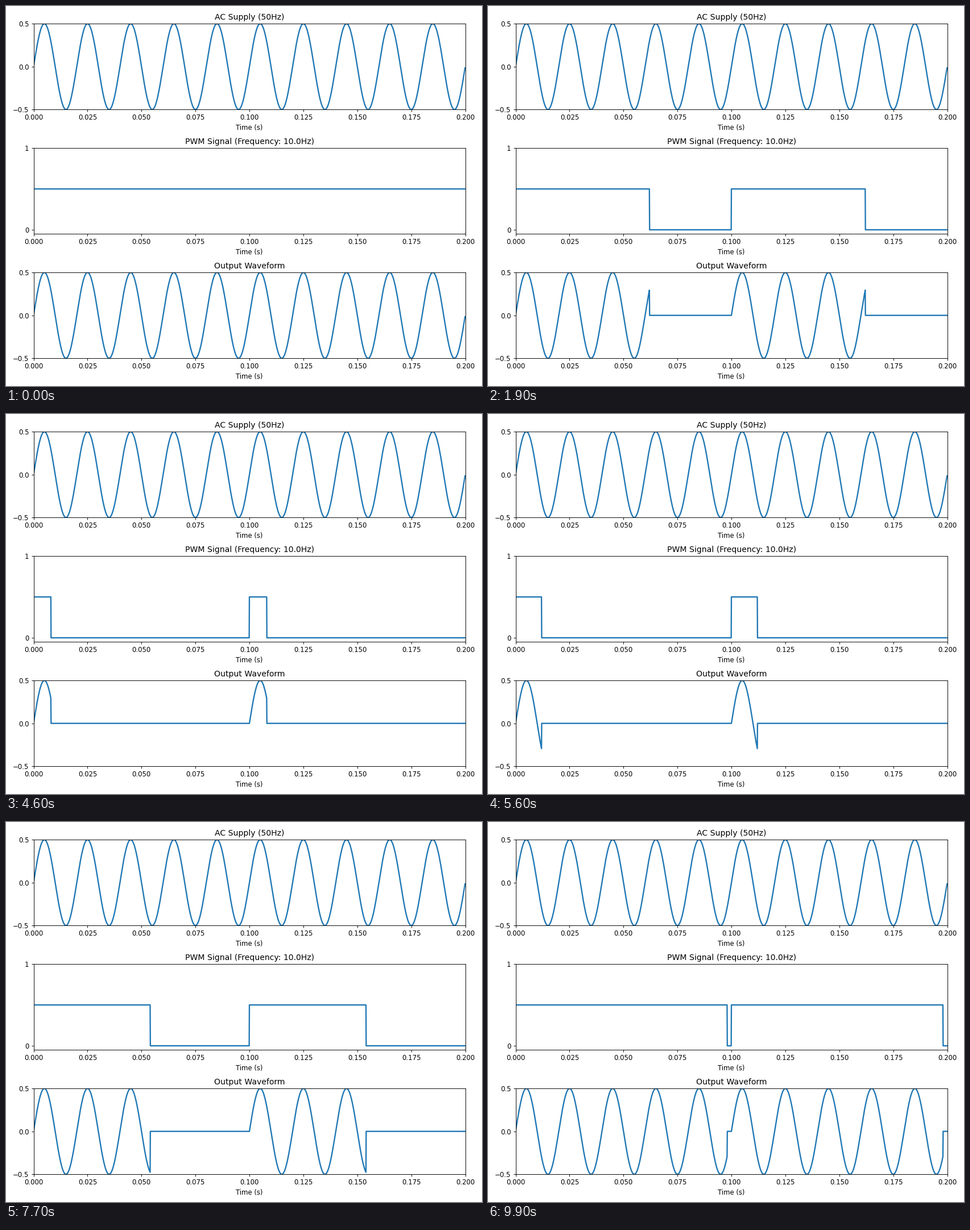
Write a matplotlib script that moves like this. It is 837 px wide and 669 px high and loops after 10 s.

```python
import numpy as np
import matplotlib.pyplot as plt
from matplotlib.animation import FuncAnimation

W, H, DPI = 837, 669, 83.7
FRAMES, INTERVAL = 100, 100

AC_FREQ, PWM_FREQ, AMP = 50, 10.0, 0.5
RATE, DURATION = 10000, 0.2

LEFT, RIGHT = 48.5, 807.5
TOP, HEIGHT, PITCH = 31.1, 151.1, 219

k = np.arange(int(RATE * DURATION))
t = k / RATE
ac = AMP * np.sin(2 * np.pi * AC_FREQ * t)
period = round(RATE / PWM_FREQ)

plt.rcParams["font.family"] = "DejaVu Sans"
# The tiny excess keeps the canvas from being floored one pixel short.
fig = plt.figure(figsize=((W + 1e-6) / DPI, (H + 1e-6) / DPI), dpi=DPI,
                 facecolor="white")


def panel(row, title, ylim, yticks):
    bottom = H - (TOP + row * PITCH + HEIGHT)
    ax = fig.add_axes([LEFT / W, bottom / H, (RIGHT - LEFT) / W, HEIGHT / H])
    ax.set_title(title)
    ax.set_xlabel("Time (s)")
    ax.set_xlim(0, DURATION)
    ax.set_ylim(*ylim)
    ax.set_yticks(yticks)
    line, = ax.plot(t, ac, color="tab:blue", lw=2)
    return line


panel(0, f"AC Supply ({AC_FREQ}Hz)", (-AMP, AMP), [-0.5, 0.0, 0.5])
pwm_line = panel(1, f"PWM Signal (Frequency: {PWM_FREQ}Hz)", (-0.05, 1), [0, 1])
out_line = panel(2, "Output Waveform", (-AMP, AMP), [-0.5, 0.0, 0.5])


def update(i):
    # Duty cycle falls from 1 to 0 and climbs back over one loop.
    duty = abs(1 - 2 * i / FRAMES)
    on = round(duty * period)
    gate = (k % period <= on) & (on > 0)
    pwm_line.set_ydata(AMP * gate)
    out_line.set_ydata(ac * gate)
    return pwm_line, out_line


anim = FuncAnimation(fig, update, frames=FRAMES, interval=INTERVAL,
                     init_func=lambda: update(0), repeat=True, blit=False)
plt.show()
```
